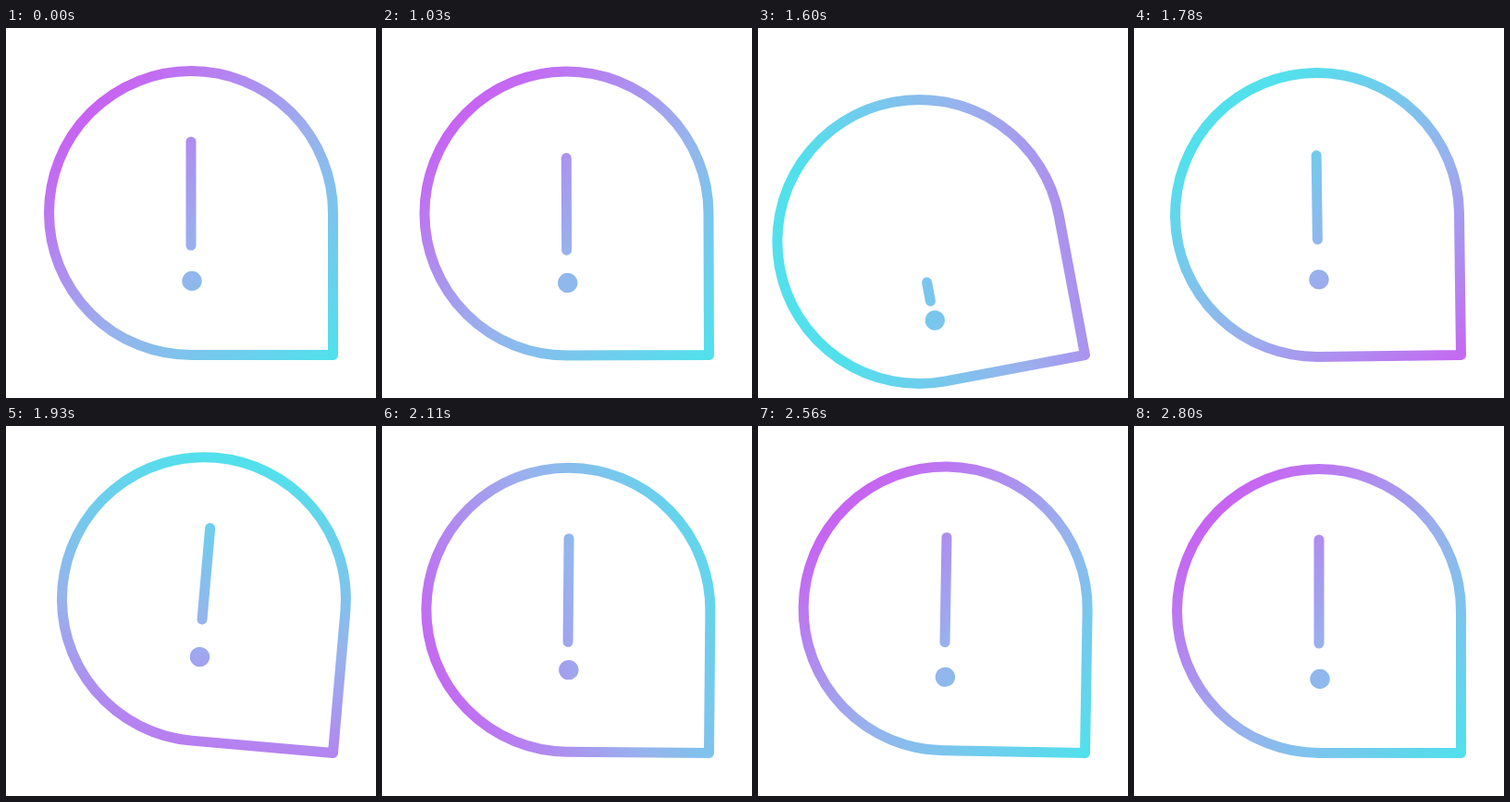
An HTML page that plays this animation: 400 by 400 pixels, repeating every 2.83 s.

```html
<!DOCTYPE html>
<html lang="en">
<head>
<meta charset="utf-8">
<title>Alert bubble</title>
<style>
  html, body { margin: 0; width: 100%; height: 100%; overflow: hidden; background: #fff; }
  svg { display: block; width: 100%; height: 100%; }
</style>
</head>
<body>
<svg viewBox="0 0 400 400">
  <defs>
    <linearGradient id="ink" gradientUnits="userSpaceOnUse" x1="-185" x2="185" y1="0" y2="0">
      <stop offset="0" stop-color="#c764f2"/>
      <stop offset=".5" stop-color="#98b2ed"/>
      <stop offset="1" stop-color="#52e0ec"/>
    </linearGradient>
  </defs>
  <g id="bubble" fill="none" stroke="url(#ink)" stroke-width="11" stroke-linecap="round" stroke-linejoin="round">
    <path d="M353.5 353.5H200A153.5 153.5 0 1 1 353.5 200Z"/>
    <line id="bar" x1="200" x2="200"/>
    <circle id="dot" cx="201" r="10.7" fill="url(#ink)" stroke="none"/>
  </g>
</svg>
<script>
  const LOOP = 2830, START = 1030, STEP = 30;
  const $ = id => document.getElementById(id);
  const ink = $('ink'), bubble = $('bubble'), bar = $('bar'), dot = $('dot');

  // Progress from 0 to 1 between two times, linear or eased at both ends
  const ramp = (t, from, to) => Math.min(1, Math.max(0, (t - from) / (to - from)));
  const ease = (t, from, to) => {
    const u = ramp(t, from, to);
    return u * u * (3 - 2 * u);
  };

  // Tips back, holds, then rocks to rest: -11, 5, -3, 1, 0 degrees
  const swing = t =>
    -11 * ease(t, 1000, 1385) + 16 * ease(t, 1567, 1925) - 8 * ease(t, 1925, 2267)
    + 4 * ease(t, 2267, 2540) - ease(t, 2540, 2800);

  function draw(t) {
    const turn = swing(t);
    bubble.setAttribute('transform', `rotate(${turn} 353.5 353.5)`);

    // The gradient makes one turn, independent of the swing
    const spin = 45 + 360 * ease(t, 1000, 2533);
    const shift = -15 * Math.sin(Math.PI * ramp(t, 1000, 2533));
    ink.setAttribute('gradientTransform',
      `rotate(${-turn} 353.5 353.5) translate(234 210) rotate(${spin}) translate(${shift})`);

    // The bar drops into the dot, pops out again and settles
    const drop = ramp(t, 1000, 1270), pop = ease(t, 1500, 1840), settle = ease(t, 2340, 2600);
    const top = 123 + 154 * (drop - pop);
    const end = 235 + 42 * drop - 55 * pop + 35 * ease(t, 1950, 2340) - 22 * settle;
    bar.setAttribute('y1', top);
    bar.setAttribute('y2', Math.max(top + 0.01, end));
    dot.setAttribute('cy', 273.5 + 14 * drop - 25 * ease(t, 1567, 1900) + 18 * ease(t, 2040, 2340) - 7 * settle);
  }

  const begin = performance.now();
  function tick() {
    const t = (performance.now() - begin) % LOOP;
    draw(t < START ? 0 : START + Math.floor((t - START) / STEP) * STEP);
    requestAnimationFrame(tick);
  }
  draw(0);
  requestAnimationFrame(tick);
</script>
</body>
</html>
```
